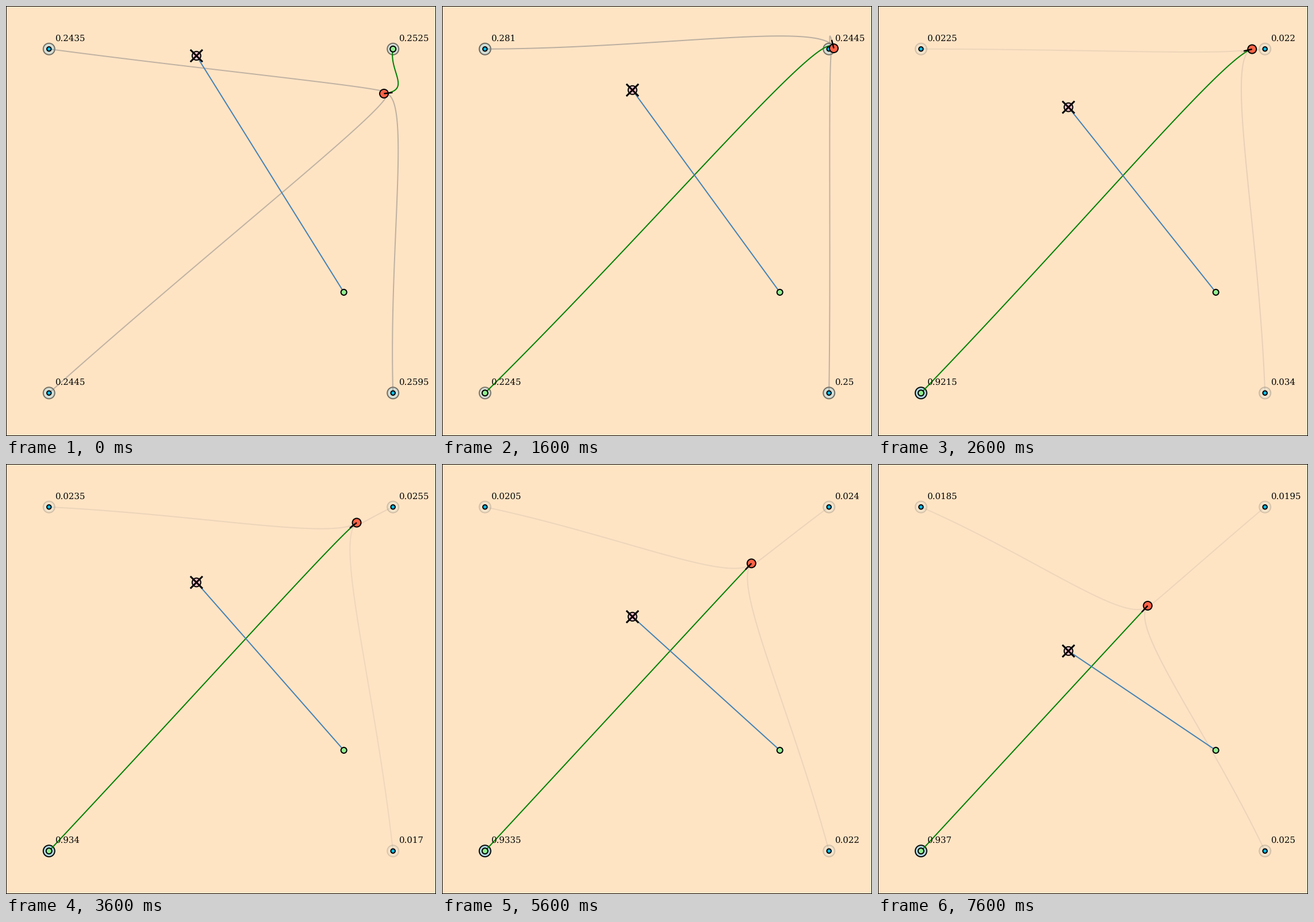
Write a matplotlib script that moves like this. It is 748 by 748 pixels and loops after 8 s.

```python
import numpy as np
import matplotlib.pyplot as plt
from matplotlib.animation import FuncAnimation
from matplotlib.patches import Circle, Rectangle

plt.rcParams["text.hinting"] = "no_hinting"

SIZE, DPI = 748, 64
PT = 72 / DPI                 # points per pixel
FRAMES, INTERVAL = 80, 100
HOLD = 5                      # frames per simulation step
STEPS = FRAMES // HOLD

# Corner goals: top left, top right, bottom left, bottom right
LO, HI = 0.1 * SIZE, 0.9 * SIZE
GOALS = np.array([(LO, LO), (HI, LO), (LO, HI), (HI, HI)])
FIRST_GOAL, NEXT_GOAL, SWITCH = 1, 2, 4

# Key beliefs: step, then top left, top right, bottom right;
# the bottom left goal takes the remainder
BELIEFS = np.array([
    (0, 0.2435, 0.2525, 0.2595),
    (4, 0.281, 0.2445, 0.25),
    (6, 0.0225, 0.022, 0.034),
    (8, 0.0235, 0.0255, 0.017),
    (10, 0.0175, 0.0245, 0.0255),
    (14, 0.0235, 0.0235, 0.018),
    (16, 0.0185, 0.0195, 0.025),
])
SAMPLES = 2000                # beliefs are fractions of this count

HUMAN_START = np.array([331.3, 86.6])
HUMAN_STEP = np.array([0, 14.92])
HUMAN_GOAL = (587.7, 498)
REACH = 50                    # length of the first Bezier arm
NOSE = 15
ARM = 10.6


def unit(angle):
    rad = np.radians(angle)
    return np.array([np.cos(rad), -np.sin(rad)])


def simulate():
    """Robot position and heading at each step."""
    pos, angle = np.array([657.5, 152.4]), 7
    states = [(pos, angle)]
    for step in range(1, STEPS + 1):
        if step <= SWITCH:
            angle = 7 + 97 * (step / SWITCH) ** 0.78
            speed = 22.5
        else:
            # Turn towards the new goal, slower while facing away from it
            error = 123 * 0.525 ** (step - SWITCH)
            angle = 227 - error
            speed = 25.25 * np.cos(np.radians(error))
        pos = pos + speed * unit(angle)
        states.append((pos, angle))
    return states


def beliefs(step):
    tl, tr, br = (round(np.interp(step, BELIEFS[:, 0], col) * SAMPLES)
                  for col in BELIEFS.T[1:])
    return [n / SAMPLES for n in (tl, tr, SAMPLES - tl - tr - br, br)]


def approach(start, heading, goal):
    """Cubic Bezier leaving along the heading, then via the midpoint."""
    t = np.linspace(0, 1, 120)[:, None]
    mid = (start + goal) / 2
    return ((1 - t) ** 3 * start + 3 * t * (1 - t) ** 2 * (start + REACH * heading)
            + 3 * t ** 2 * (1 - t) * mid + t ** 3 * goal)


fig = plt.figure(figsize=(SIZE / DPI, SIZE / DPI), dpi=DPI, facecolor="bisque")
ax = fig.add_axes([0, 0, 1, 1])
ax.set_xlim(0, SIZE)
ax.set_ylim(SIZE, 0)
ax.axis("off")


def disc(center, radius, color, z):
    patch = Circle(center, radius, facecolor=color, edgecolor="black",
                   linewidth=2 * PT, zorder=z)
    return ax.add_patch(patch)


def stroke(color, width, z):
    line, = ax.plot([], [], color=color, linewidth=width * PT, zorder=z,
                    solid_capstyle="butt")
    return line


# Half of the frame's stroke falls outside the stage
ax.add_patch(Rectangle((0, 0), SIZE, SIZE, fill=False, edgecolor="black",
                       linewidth=2 * PT, snap=False, zorder=20))

rings = [disc(g, 10, "lightblue", 1) for g in GOALS]
paths = [stroke("grey", 2, 2) for _ in GOALS]
dots = [disc(g, 3.74, "deepskyblue", 4) for g in GOALS]
labels = [ax.text(x + 10, y - 14, "", family="DejaVu Serif", fontsize=15 * PT,
                  color="black", va="baseline", zorder=5) for x, y in GOALS]

sight = stroke("steelblue", 2, 6)
disc(HUMAN_GOAL, 5, "lightgreen", 7)
human = disc((0, 0), 7.48, "pink", 8)
cross = [stroke("black", 3, 9) for _ in range(2)]
robot = disc((0, 0), 7.48, "tomato", 10)
nose = stroke("black", 2.5, 11)

states = simulate()


def draw(frame):
    step = (frame + HOLD - 1) // HOLD
    active = FIRST_GOAL if step < SWITCH else NEXT_GOAL

    pos, angle = states[step]
    heading = unit(angle)
    robot.center = pos
    nose.set_data(*np.column_stack([pos, pos + NOSE * heading]))

    for i, prob in enumerate(beliefs(step)):
        alpha = prob ** 0.5
        on = i == active
        rings[i].set_alpha(alpha)
        paths[i].set_data(*approach(pos, heading, GOALS[i]).T)
        paths[i].set(color="green" if on else "grey", alpha=1 if on else alpha,
                     zorder=3 if on else 2)
        dots[i].set(radius=5 if on else 3.74,
                    facecolor="lightgreen" if on else "deepskyblue")
        labels[i].set_text(f"{prob:g}")

    hx, hy = HUMAN_START + step * HUMAN_STEP
    human.center = hx, hy
    sight.set_data([hx, HUMAN_GOAL[0]], [hy, HUMAN_GOAL[1]])
    for line, sign in zip(cross, (1, -1)):
        line.set_data([hx - ARM, hx + ARM], [hy - sign * ARM, hy + sign * ARM])
    return []


anim = FuncAnimation(fig, draw, frames=FRAMES, interval=INTERVAL,
                     repeat=True, repeat_delay=0)
plt.show()
```
